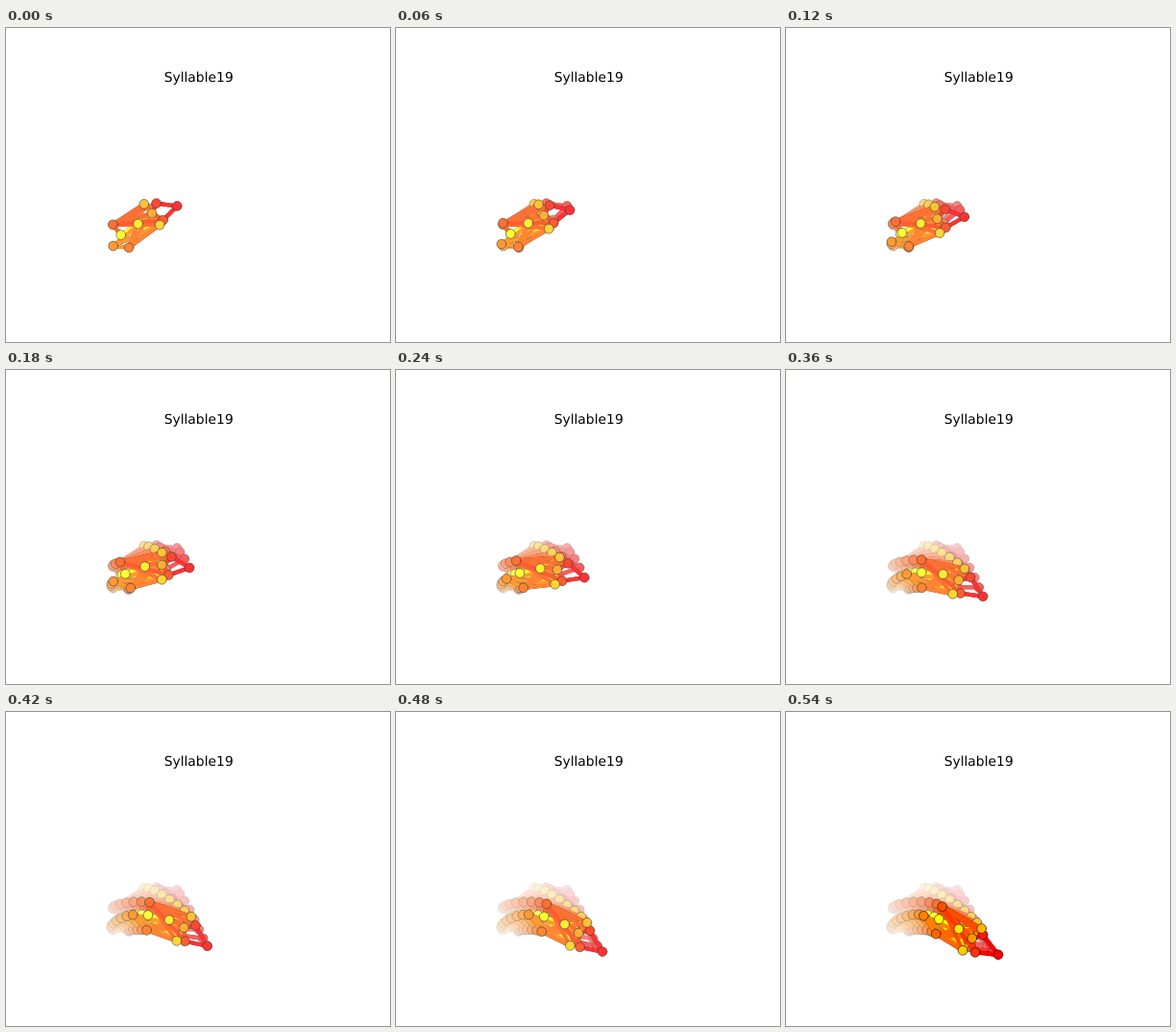
An HTML page with a canvas for the animation above (0.6 s loop, 400x327 px).

```html
<!DOCTYPE html>
<html lang="en">
<head>
<meta charset="utf-8">
<title>Syllable19</title>
<style>
  html, body { margin: 0; width: 100%; height: 100%; overflow: hidden; background: #fff; }
  canvas, svg { position: absolute; left: 0; top: 0; width: 400px; height: 327px; }
  text { font: 13.89px "DejaVu Sans", sans-serif; text-anchor: middle; text-rendering: geometricPrecision; }
</style>
</head>
<body>
<canvas id="stage" width="400" height="327"></canvas>
<svg viewBox="0 0 400 327"><text x="200.7" y="56">Syllable19</text></svg>
<script>
const ctx = document.getElementById('stage').getContext('2d');
const STEP = 60, STEPS = 10, VEIL = 0.2;

// Cubic through four evenly spaced values, u from 0 to 1.
function cubic([a, b, c, d], u) {
  const t = 3 * u;
  return (-a * (t - 1) * (t - 2) * (t - 3) + 3 * b * t * (t - 2) * (t - 3)
    - 3 * c * t * (t - 1) * (t - 3) + d * t * (t - 1) * (t - 2)) / 6;
}

// Body part: length at start and end, and its heading in degrees over time.
const part = (from, to, ...headings) => u => {
  const length = from + (to - from) * u;
  const angle = cubic(headings, u) * Math.PI / 180;
  return [length * Math.cos(angle), length * Math.sin(angle)];
};

const rump = part(14, 16.4, -55, -32, -6, 12);
const loin = part(21.2, 23, -33, -20.5, 4.5, 26.6);
const chest = part(18.2, 17, -37, -5.5, 20.8, 35);
const neck = part(8.3, 9.1, -12, 7, 37, 37);
const snout = part(19, 23, -18, 5.5, 32.5, 30);
const hips = part(14.6, 14.6, -35, -22, -0.5, 12.8);
const shoulders = part(13.6, 15, -37, 0, 25, 40.6);
const eyes = part(9.4, 10, -22, 9, 32, 23.7);

const add = ([x, y], [dx, dy]) => [x + dx, y + dy];
const sub = ([x, y], [dx, dy]) => [x - dx, y - dy];

// The two points beside a spine point, across the heading.
function pair([x, y], [dx, dy], sag = 1.2) {
  y += sag;
  return [[x + dy, y - dx], [x - dy, y + dx]];
}

// Joints in colour order, from the nose (red) to the back (yellow).
function pose(u) {
  const mid = [cubic([137.5, 144.7, 163.6, 180], u), cubic([204, 204.7, 212.7, 226], u)];
  const back = sub(mid, loin(u));
  const tail = sub(back, rump(u));
  const nape = add(mid, chest(u));
  const head = add(nape, neck(u));
  return [
    add(head, snout(u)),
    ...pair(head, eyes(u), 0),
    ...pair(back, hips(u)),
    tail,
    nape,
    ...pair(nape, shoulders(u)),
    mid,
    back
  ];
}

// Later joints first, so that the red links lie on top.
const EDGES = '10-8 10-9 9-8 9-7 6-7 6-8 5-8 5-6 5-4 4-9 4-7 4-6 4-8 3-10 3-9 3-8 3-6 3-1 3-7 2-3 2-6 1-6 0-2 0-1'
  .split(' ').map(e => e.split('-').map(Number));

const color = i => `rgb(255, ${Math.round(25.5 * i)}, 0)`;

const poses = Array.from({ length: STEPS }, (_, s) => pose(s / (STEPS - 1)));

function link(a, b, style) {
  ctx.strokeStyle = style;
  ctx.beginPath();
  ctx.moveTo(...a);
  ctx.lineTo(...b);
  ctx.stroke();
}

function drawPose(joints) {
  ctx.lineCap = 'square';
  ctx.lineWidth = 4.17;
  for (const [a, b] of EDGES) link(joints[a], joints[b], '#000');
  for (const [a, b] of EDGES) link(joints[a], joints[b], color(a));
  ctx.lineWidth = 0.56;
  ctx.strokeStyle = '#000';
  joints.forEach(([x, y], i) => {
    ctx.fillStyle = color(i);
    ctx.beginPath();
    ctx.arc(x, y, 4.91, 0, 2 * Math.PI);
    ctx.fill();
    ctx.stroke();
  });
}

function cover(alpha) {
  ctx.fillStyle = `rgba(255, 255, 255, ${alpha})`;
  ctx.fillRect(0, 0, 400, 327);
}

// Every pose but the last fades the picture under a white veil.
function draw(step) {
  cover(1);
  for (let s = 0; s <= step; s++) {
    drawPose(poses[s]);
    if (s < STEPS - 1) cover(VEIL);
  }
}

const start = performance.now();
let shown = -1;
function tick() {
  const step = Math.floor((performance.now() - start) / STEP) % STEPS;
  if (step !== shown) draw(shown = step);
  requestAnimationFrame(tick);
}
tick();
</script>
</body>
</html>
```
